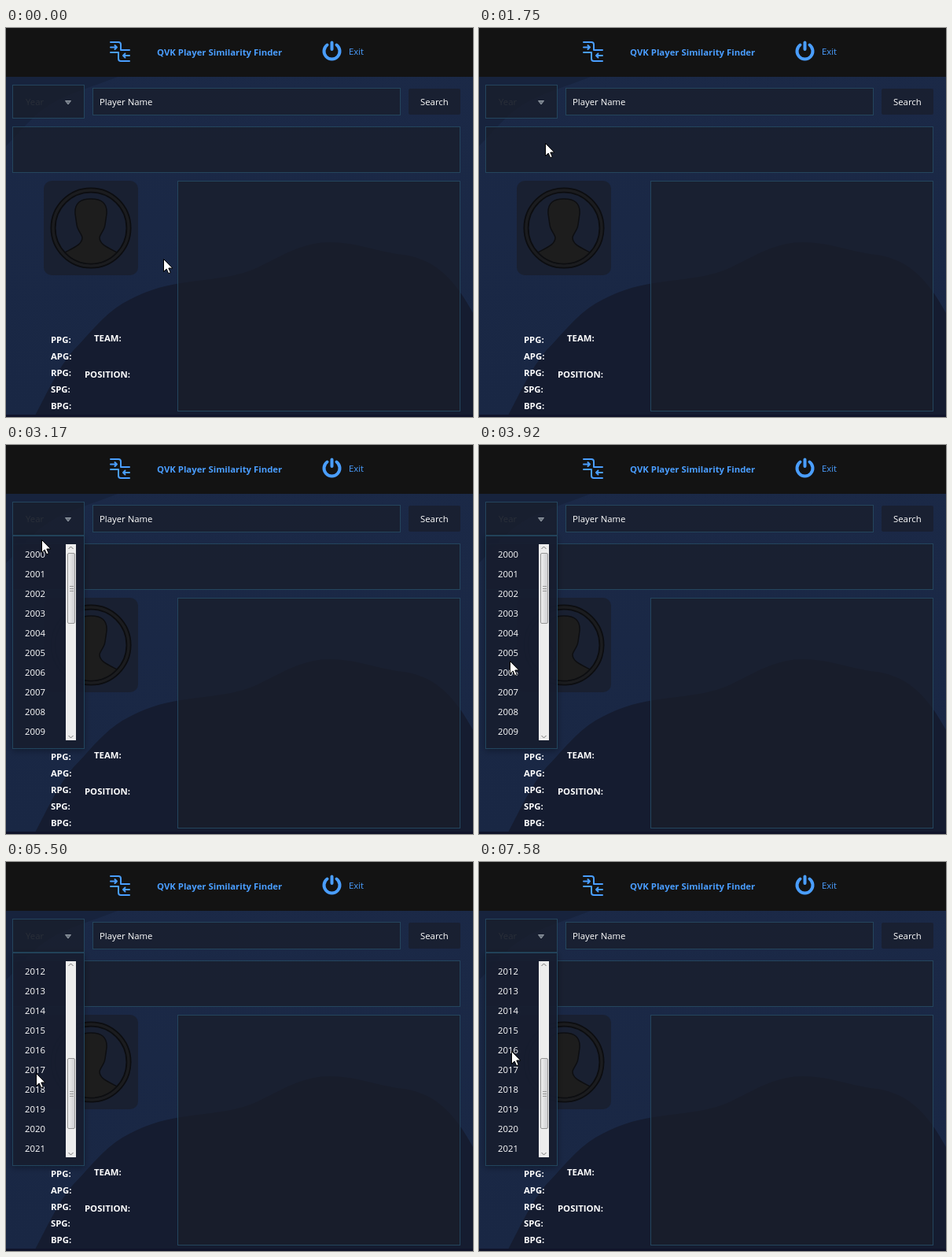
An HTML page that plays this animation: 594 px wide and 494 px high, repeating every 8 s.

```html
<!DOCTYPE html>
<html lang="en">
<head>
<meta charset="utf-8">
<title>Player Similarity Finder</title>
<style>
  html, body { margin: 0; width: 100%; height: 100%; overflow: hidden; background: #1a2846; }
  svg { display: block; width: 594px; height: 494px; font: 11.35px "Open Sans", "Noto Sans", sans-serif; fill: #fff; }
  .bold { font-weight: 700; }
  .blue { fill: #4a9eff; }
  .line { fill: none; stroke: #4a9eff; }
  .panel { fill: #1a1e2a; fill-opacity: .72; }
  .edge { stroke: #24455d; }
</style>
</head>
<body>
<svg viewBox="0 0 594 494">
  <defs>
    <linearGradient id="sky" x2="0" y2="1">
      <stop stop-color="#1b2947"/><stop offset="1" stop-color="#192744"/>
    </linearGradient>
    <linearGradient id="grip">
      <stop stop-color="#efefef"/><stop offset="1" stop-color="#cfcfd2"/>
    </linearGradient>
    <filter id="shade" x="-20%" y="-10%" width="140%" height="120%">
      <feDropShadow dx="0" dy="2" stdDeviation="4" flood-opacity=".35"/>
    </filter>
  </defs>

  <!-- backdrop -->
  <path fill="url(#sky)" d="M0 0H594V494H0Z"/>
  <path fill="#17233d" d="M0 62H142C112 74 82 82 58 96S20 130 0 150Z"/>
  <path fill="#151c30" d="M36 494C50 468 66 432 86 409C105 390 122 366 148 350C174 335 196 328 222 324C256 318 286 319 318 305C350 290 376 272 412 272C452 273 470 284 506 288C548 294 572 322 594 362V494Z"/>
  <path fill="#10142a" d="M0 491H594V494H0Z"/>

  <!-- header -->
  <path fill="#131313" d="M0 0H594V62H0Z"/>
  <g class="line" stroke-width="2" stroke-linecap="round" stroke-linejoin="round">
    <path d="M133 18H143Q146 18 146 21V28H157M133 31H143V39Q143 42 146 42H157"/>
    <path d="M133 24.500H141M138.500 22L141 24.500L138.500 27M157 35H149M151.500 32.500L149 35L151.500 37.500"/>
  </g>
  <text class="bold blue" x="192" y="35">QVK Player Similarity Finder</text>
  <path class="line" stroke-width="4" stroke-linecap="round" d="M408.500 21.500A10 10 0 1 0 420.500 21.500M414.500 18.500V27"/>
  <text class="blue" x="436" y="34">Exit</text>

  <!-- form -->
  <g class="panel">
    <rect class="edge" x="8.500" y="72.500" width="91" height="42"/>
    <rect class="edge" x="110.500" y="76.500" width="391" height="34"/>
    <rect x="512" y="77" width="66" height="33" rx="2"/>
    <rect class="edge" x="8.500" y="125.500" width="569" height="58"/>
    <rect class="edge" x="218.500" y="194.500" width="359" height="292"/>
    <rect x="48" y="194" width="120" height="120" rx="10"/>
  </g>
  <text x="25" y="98" fill="#2a2f39">Year</text>
  <path d="M75.500 92.500H82.500L79 97Z" fill="#6c7580" stroke="#929aa4"/>
  <text x="119" y="98">Player Name</text>
  <text x="527" y="98">Search</text>

  <!-- avatar -->
  <circle cx="108" cy="254" r="48" fill="none" stroke="#0c0d10" stroke-width="7"/>
  <circle cx="108" cy="254" r="48" fill="none" stroke="#1b1c1f" stroke-width="3.500"/>
  <path fill="#1d1d1d" stroke="#0d0e11" stroke-width="1.500" d="M88 236C87 222 95 217 108 217S129 222 128 236L126 250C125 257 120 261 119 266C119 274 126 277 141 285A45 45 0 0 1 75 285C90 277 97 274 97 266C96 261 91 257 90 250Z"/>

  <g class="bold" id="stats">
    <text x="112" y="398">TEAM:</text>
    <text x="100" y="444">POSITION:</text>
  </g>

  <!-- year list -->
  <g id="popup">
    <rect class="edge" x="8.500" y="115.500" width="91" height="270" fill="#18202f" fill-opacity=".93" filter="url(#shade)"/>
    <g id="years"></g>
    <path fill="#ededed" d="M76 126H89V375H76Z"/>
    <path fill="none" stroke="#777" d="M79.500 132L82.500 129L85.500 132M79.500 369L82.500 372L85.500 369"/>
    <g id="thumb">
      <rect x="78.500" y=".5" width="9" height="89" rx="1.500" fill="url(#grip)" stroke="#979797"/>
      <path stroke="#999" d="M81 42.500H86M81 45.500H86M81 48.500H86"/>
    </g>
  </g>

  <path id="cursor" stroke="#000" d="M.5 .5V16.500L4.200 13L6.700 18.700L9.300 17.600L6.800 12H11.800Z"/>
</svg>
<script>
  const LOOP = 8000, FPS = 12, ROW = 25, ROWS = 10;
  const OPEN = 33;                   // tick at which the list opens
  const NOTCHES = [49, 57, 60, 66];  // ticks of the wheel, three rows each
  // pointer path: tick, x, y
  const PATH = [
    [8, 200, 293], [9, 197, 289], [11, 184, 272], [14, 160, 241], [16, 135, 208],
    [18, 115, 182], [22, 74, 134], [25, 46, 99], [27, 39, 91], [32, 39, 91],
    [35, 42, 98], [38, 45, 120], [42, 44, 205], [48, 38, 288], [52, 37, 299],
    [55, 38, 268], [70, 38, 268], [73, 39, 282], [76, 40, 293], [81, 40, 293],
    [84, 43, 299], [88, 42, 264], [91, 41, 240]
  ];
  const el = id => document.getElementById(id);

  function addText(parent, x, y, label) {
    const node = document.createElementNS("http://www.w3.org/2000/svg", "text");
    node.setAttribute("x", x);
    node.setAttribute("y", y);
    node.textContent = label;
    parent.append(node);
    return node;
  }

  ["PPG:", "APG:", "RPG:", "SPG:", "BPG:"].forEach((s, i) => addText(el("stats"), 57, 400 + 21 * i, s));
  const years = Array.from({ length: ROWS }, (_, i) => addText(el("years"), 24, 143 + ROW * i, ""));

  function pointer(tick) {
    const next = PATH.findIndex(p => p[0] > tick);
    if (next === 0) return PATH[0].slice(1);
    if (next < 0) return PATH[PATH.length - 1].slice(1);
    const a = PATH[next - 1], b = PATH[next];
    const k = (tick - a[0]) / (b[0] - a[0]);
    return [1, 2].map(i => Math.round(a[i] + (b[i] - a[i]) * k));
  }

  function draw(now) {
    const tick = Math.floor(now % LOOP * FPS / 1000 + 0.05);
    const notch = NOTCHES.filter(t => t <= tick).length;
    el("popup").style.display = tick < OPEN ? "none" : "";
    years.forEach((node, i) => node.textContent = 2000 + 3 * notch + i);
    el("thumb").setAttribute("transform", `translate(0 ${137 + 28 * notch})`);
    el("cursor").setAttribute("transform", `translate(${pointer(tick)})`);
    requestAnimationFrame(draw);
  }
  draw(performance.now());
</script>
</body>
</html>
```
